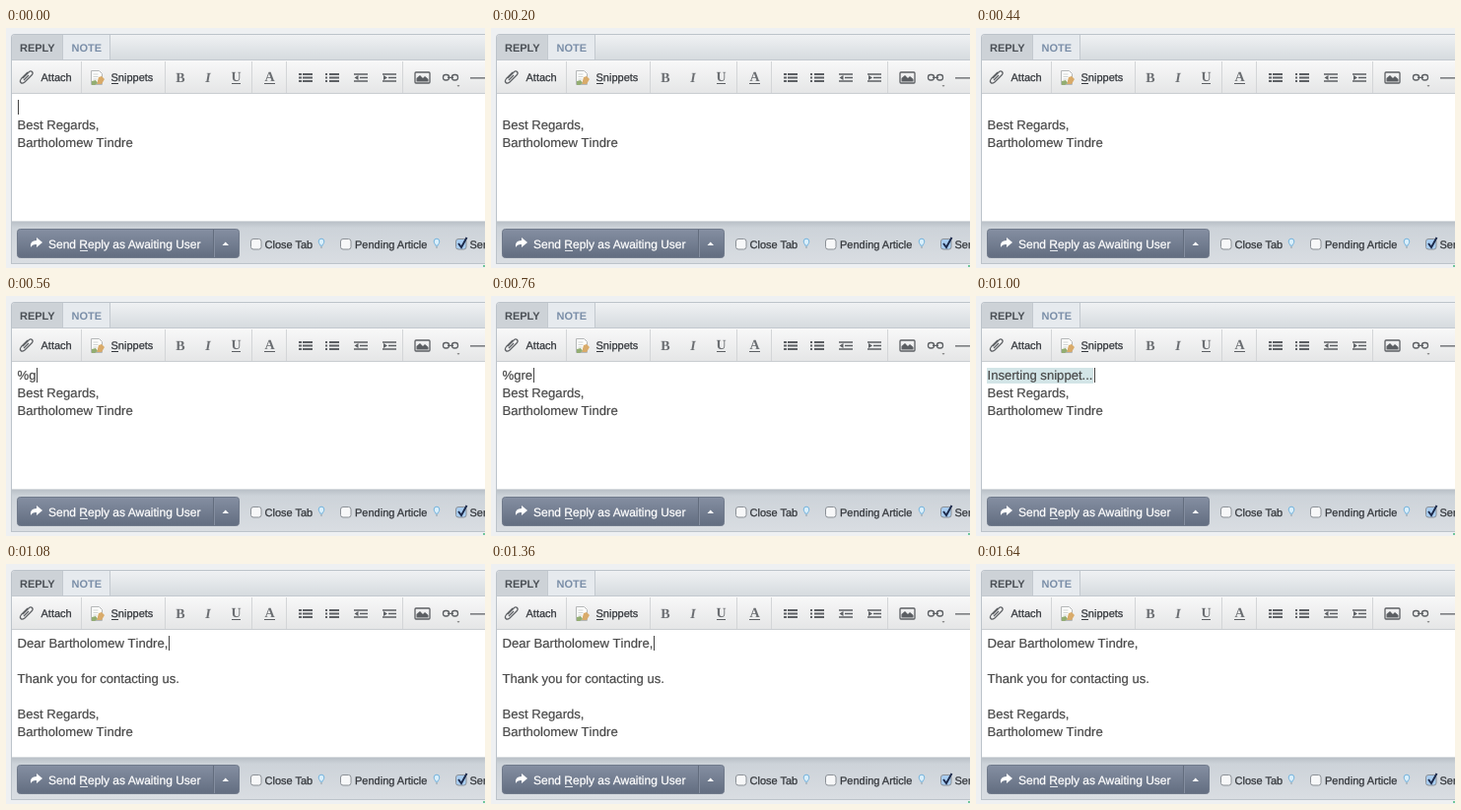
An HTML page for the animation above (1720 ms loop, 486 by 244 pixels).

```html
<!DOCTYPE html>
<html lang="en">
<head>
<meta charset="utf-8">
<title>Reply editor snippet</title>
<style>
  html, body { margin: 0; width: 100%; height: 100%; overflow: hidden; background: #eef0f2; }
  svg { display: block; font: 11px "Liberation Sans", Arial, sans-serif; text-rendering: geometricPrecision; }
  .label { fill: #33363b; stroke: #33363b; stroke-width: .25; }
  .tab { font-weight: bold; }
  .body { font-size: 13.1px; font-kerning: none; fill: #484848; stroke: #484848; stroke-width: .2; }
  .serif { font: bold 14px "Liberation Serif", Times, serif; fill: #6b6e72; text-anchor: middle; }
  .line { fill: none; stroke: #5c5f63; }
</style>
</head>
<body>
<svg width="486" height="244" viewBox="0 0 486 244">
  <defs>
    <linearGradient id="tabs" x2="0" y2="1"><stop stop-color="#eff1f3"/><stop offset="1" stop-color="#d5dade"/></linearGradient>
    <linearGradient id="tools" x2="0" y2="1"><stop stop-color="#f8f8f8"/><stop offset="1" stop-color="#e5e6e7"/></linearGradient>
    <linearGradient id="footer" x2="0" y2="1"><stop stop-color="#b9c0c7"/><stop offset=".15" stop-color="#cdd3d9"/><stop offset="1" stop-color="#d9dde2"/></linearGradient>
    <linearGradient id="button" x2="0" y2="1"><stop stop-color="#858fa2"/><stop offset="1" stop-color="#626d80"/></linearGradient>
    <g id="bulb" fill="#d9effb" stroke="#6aaedb" stroke-width=".9">
      <path d="M-1.2 2.2C-1.2 .8-2.8 0-2.8-2a2.8 2.8 0 0 1 5.6 0C2.8 0 1.2.8 1.2 2.2z"/>
      <path d="M-1 4h2" stroke="#8496a3"/>
    </g>
    <rect id="box" x=".5" y=".5" width="10.500" height="10.500" rx="2.500" stroke="#8b9096"/>
  </defs>

  <!-- Panel -->
  <path d="M5 244V10q0-4 4-4h477v234H5z" fill="#bcc3ca"/>
  <rect y="240" width="486" height="4" fill="#eef0f2"/>
  <rect x="484" y="241" width="2" height="2" fill="#6fc59a"/>
  <path d="M6 33V10q0-3 3-3h477v26z" fill="url(#tabs)"/>
  <path d="M6 33V10q0-3 3-3h48v26z" fill="#cdd2d7"/>
  <path d="M58 7h47v25H58z" fill="#e6eaee"/>
  <path d="M57.500 7v25M105.500 7v25M6 32.500h480" stroke="#c3c9cf"/>
  <path d="M6 33h480v33H6z" fill="url(#tools)"/>
  <path d="M6 66.500h480" stroke="#c9cdd1"/>
  <path d="M6 67h480v129H6z" fill="#fff"/>
  <path d="M6 196.500h480" stroke="#d5d9dd"/>
  <path d="M6 197h480v42H6z" fill="url(#footer)"/>
  <g class="tab">
    <text x="14" y="24.300" fill="#4a4f55">REPLY</text>
    <text x="66.500" y="24.300" fill="#7a8ea8">NOTE</text>
  </g>

  <!-- Toolbar -->
  <path d="M76.500 34v32M161.500 34v32M249.500 34v32M284.500 34v32M402.500 34v32" stroke="#d3d5d7"/>
  <path class="line" d="M17 51l6-6q2-2 3.500-.5t-.5 3.500l-7 7q-2.500 2-4 .5t.5-4l6.500-6.500M18 53l5-5" stroke="#8e9194" stroke-width="1.200"/>
  <text class="label" x="35.500" y="54.300">Attach</text>
  <path d="M86.500 43.500h8l3 3v11h-11z" fill="#fdfdfb" stroke="#b4b7b8"/>
  <path d="M88.500 47h5M88.500 49.500h5M88.500 52h4" stroke="#d0d4d4"/>
  <path d="M92 57l2-7 3-1 3 3-3 5z" fill="#d9ab6a"/>
  <path d="M87 54l4-1 2 3-3 2h-3z" fill="#93ad72"/>
  <text class="label" x="106.500" y="54.300">Snippets</text>
  <path d="M107 56.500h7" stroke="#33363b"/>
  <g class="serif">
    <text x="177" y="55">B</text>
    <text x="205" y="55" font-style="italic">I</text>
    <text x="233.500" y="54">U</text>
    <text x="267.500" y="54">A</text>
  </g>
  <path class="line" d="M229 56.500h9M262 56.500h11"/>
  <g id="lists" class="line" stroke-width="1.500"></g>
  <path d="M353.500 50.500l4-2.500v5zM387 50.500l-4-2.500v5z" fill="#5c5f63"/>
  <rect class="line" x="415" y="45" width="15" height="11" rx="1" stroke-width="1.300"/>
  <path d="M416.500 54.500v-3.500l3.500-3 3 3 2-2 3.500 3v2.500z" fill="#5c5f63"/>
  <g class="line" stroke-width="1.300">
    <rect x="443.500" y="47.500" width="6" height="5.500" rx="2.500"/>
    <rect x="452.500" y="47.500" width="6" height="5.500" rx="2.500"/>
    <path d="M448 50.300h6M471 50.800h15"/>
  </g>
  <path d="M457.500 58h3l-1.500 2z" fill="#888"/>

  <!-- Editor -->
  <rect id="highlight" x="11" y="73" width="108" height="16" fill="#d3e5e7"/>
  <text id="draft" class="body" x="11.500" y="85.400"></text>
  <text id="thanks" class="body" x="11.500" y="121.400">Thank you for contacting us.</text>
  <g id="signature" class="body">
    <text x="11.500" y="103.400">Best Regards,</text>
    <text x="11.500" y="121.400">Bartholomew Tindre</text>
  </g>
  <rect id="caret" y="73" width="1" height="15" fill="#444"/>

  <!-- Footer -->
  <rect x="11.500" y="204.500" width="225" height="29" rx="3" fill="url(#button)" stroke="#707a8b"/>
  <path d="M210.500 205v28" stroke="#626c7d"/>
  <path d="M211.500 205v28" stroke="#848ea0"/>
  <path d="M25 223q-1-7 6-7v-3l6 5-6 5v-3q-4-.5-6 3z" fill="#fff"/>
  <path d="M219.500 221h6.500l-3.250-3.500z" fill="#fff"/>
  <text x="43" y="224" font-size="12" fill="#fff" stroke="#fff" stroke-width=".25">Send Reply as Awaiting User</text>
  <path d="M75 226.500h8" stroke="#e8ebef"/>
  <use href="#box" x="248" y="214" fill="#f7f8f9"/>
  <use href="#box" x="339" y="214" fill="#f7f8f9"/>
  <use href="#box" x="456" y="214" fill="#a9cdf0" stroke="#5f7fa8"/>
  <path d="M459 219l3 4 5.500-10" fill="none" stroke="#1d2b4c" stroke-width="2"/>
  <g class="label">
    <text x="262.500" y="223.500">Close Tab</text>
    <text x="354" y="223.500">Pending Article</text>
    <text x="470.500" y="223.500">Send</text>
  </g>
  <use href="#bulb" x="320" y="219"/>
  <use href="#bulb" x="437" y="219"/>
</svg>
<script>
  const $ = id => document.getElementById(id);
  const LOOP = 1720;
  // Start time, first line, caret shown
  const steps = [
    [0, "", true], [40, "", false], [480, "%", true], [560, "%g", true],
    [640, "%gr", true], [720, "%gre", true], [840, "%gree", true], [920, "%greet", true],
    [1000, "Inserting snippet...", true],
    [1080, "Dear Bartholomew Tindre,", true], [1600, "Dear Bartholomew Tindre,", false]
  ];

  // Bulleted, numbered, outdent and indent icons
  [297, 324, 353, 382].forEach((x, icon) => {
    const rows = [47, 50.5, 54].map((y, row) => {
      if (icon < 2) return `M${x} ${y}h${icon ? 2 : 3}M${x + 4} ${y}h10`;
      return row === 1 ? `M${x + 6} ${y}h8` : `M${x} ${y}h14`;
    });
    $("lists").innerHTML += `<path d="${rows.join("")}" stroke-width="${icon < 2 ? 2 : 1.5}"/>`;
  });

  function draw(now) {
    const time = now % LOOP;
    const [start, line, caretOn] = steps.findLast(step => step[0] <= time);
    const inserted = start >= 1080;
    const show = (id, on) => $(id).setAttribute("visibility", on ? "visible" : "hidden");
    $("draft").textContent = line;
    show("highlight", start === 1000);
    show("thanks", inserted);
    show("caret", caretOn);
    $("signature").setAttribute("transform", `translate(0 ${inserted ? 54 : 0})`);
    const width = line ? $("draft").getComputedTextLength() + 1 : 0;
    $("caret").setAttribute("x", Math.round(11.5 + width));
  }

  function tick() {
    draw(performance.now());
    requestAnimationFrame(tick);
  }
  tick();
</script>
</body>
</html>
```
